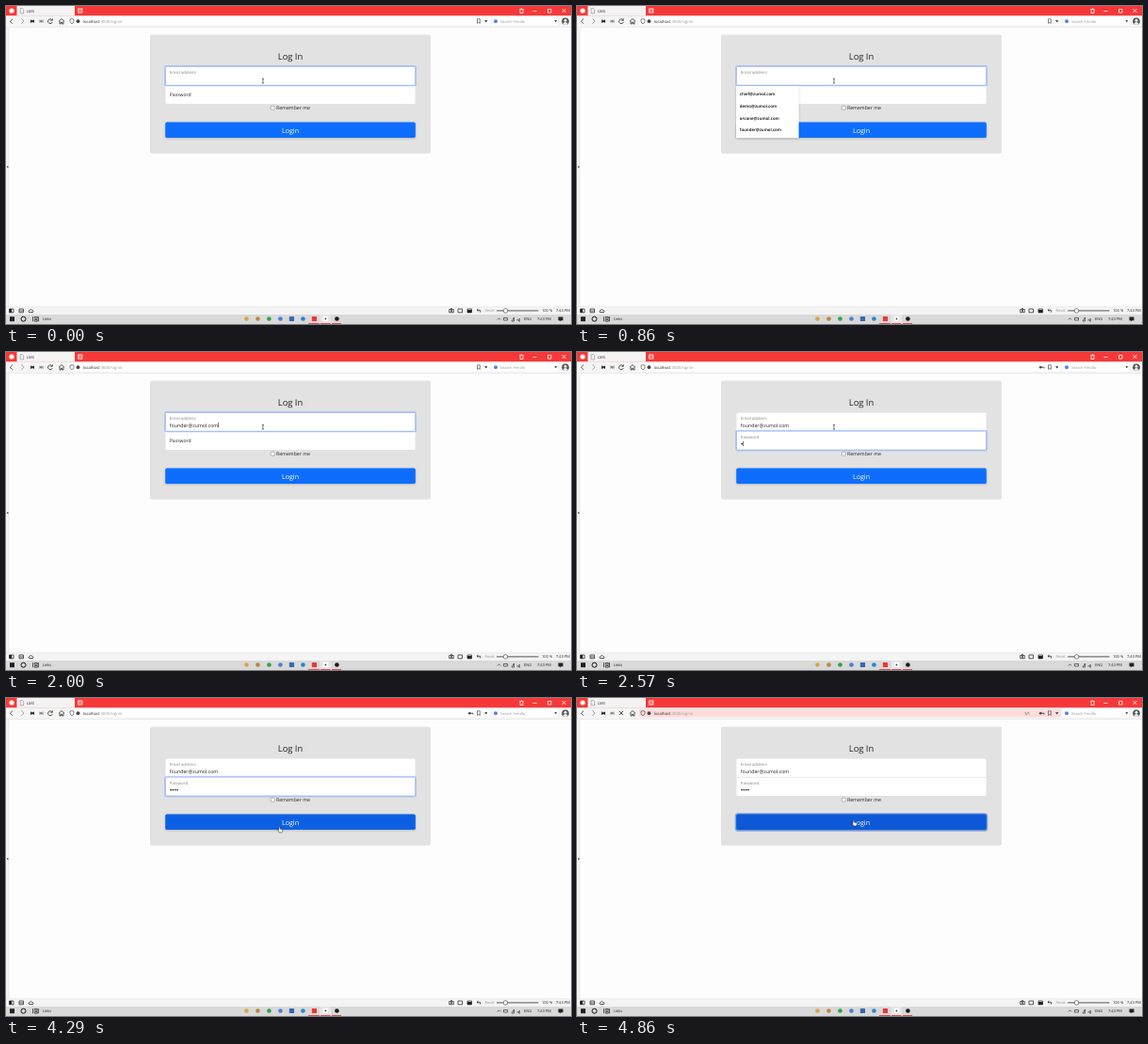
Animation of 600 by 338 pixels, one loop 5.01 s. Source, as an HTML page:

```html
<!DOCTYPE html>
<html lang="en">
<head>
<meta charset="utf-8">
<title>Log In</title>
<style>
  html, body { margin: 0; width: 100%; height: 100%; overflow: hidden; background: #fff; }
  svg { display: block; width: 100vw; height: 100vh; }
  text { font-family: "Open Sans", "Noto Sans", sans-serif; text-rendering: geometricPrecision; fill: #222; white-space: pre; }
  .line { fill: none; stroke: #333; stroke-width: .8; }
  .white { stroke: #fff; }
  .label { font-size: 4.3px; fill: #808080; }
  .value { font-size: 5.26px; }
  .item { font-size: 4.4px; fill: #000; font-weight: 600; }
  .small { font-size: 4px; }
  .grey { fill: #999; }
  .mid { text-anchor: middle; }
</style>
</head>
<body>
<svg viewBox="0 0 600 338" preserveAspectRatio="none">
  <defs>
    <filter id="shadow" x="-10%" y="-20%" width="120%" height="150%">
      <feDropShadow dx="0" dy=".6" stdDeviation="1" flood-opacity=".25"/>
    </filter>
  </defs>
  <rect width="600" height="338" fill="#fdfdfd"/>

  <!-- Tab bar -->
  <rect width="600" height="10.5" fill="#f63838"/>
  <circle cx="6" cy="5" r="2.600" fill="#fff"/>
  <path d="M11.500 10.500V0H73V10.500Z" fill="#f4f2f2"/>
  <path class="line" style="stroke-width:.5;stroke:#777" d="M15.200 2.500h2.200l1.200 1.200v4.200h-3.400z"/>
  <text class="small" x="22" y="6.700">LMS</text>
  <rect x="76" y="2.300" width="5.500" height="5.500" rx="1" fill="#ffb4b4"/>
  <path class="line" style="stroke:#f44" d="M78.750 3.500v3M77.250 5h3"/>
  <path class="line white" d="M545.500 3.500h4M546 3.500v4h3v-4M547 2.700h1M559.500 5.500h4M575.500 3.500h3.500v3.500h-3.500zM590.500 3l4 4m0-4l-4 4"/>

  <!-- Address bar -->
  <rect y="10.500" width="600" height="12" fill="#f5f5f5"/>
  <rect id="address" x="66" y="11.800" width="448" height="8.800" rx="1"/>
  <rect x="516" y="11.800" width="70" height="8.800" rx="1" fill="#fff"/>
  <path d="M0 22.500H600" stroke="#e2e2e2" stroke-width=".6"/>
  <path class="line" d="M7 13.600L4.400 16.200l2.600 2.600"/>
  <path class="line" style="stroke:#888" d="M16.400 13.600l2.600 2.600-2.600 2.600"/>
  <path fill="#222" d="M26 14.400v3.600h.8v-1.400l1.600 1.400v-1.200l1.600 1.200v-3.600l-1.600 1.200v-1.200l-1.600 1.400v-1.400z"/>
  <path fill="#888" d="M35.500 14.400v3.600l1.600-1.200v1.200l1.600-1.400v1.400h.8v-3.600h-.8v1.400l-1.600-1.400v1.200z"/>
  <path id="reload" class="line" d="M48.800 14.700A2.400 2.400 0 1 0 49.300 17M49.300 13.300v2h-2"/>
  <path id="stop" class="line" d="M45 14l4 4m0-4l-4 4"/>
  <path class="line" d="M56 16.200l3-2.600 3 2.600M57 16v3h1.300v-1.700h1.400v1.700h1.300v-3"/>
  <path class="line" style="stroke-width:.6" d="M70 13.600l2 .6v2q0 1.700-2 2.600-2-.9-2-2.600v-2z"/>
  <circle cx="76.500" cy="16.200" r="1.900" fill="#444"/>
  <text x="82" y="17.600" font-size="4.200px">localhost<tspan class="grey">:3000/signin</tspan></text>
  <text id="progress" class="small" x="475" y="17.600" fill="#555">1/1</text>
  <g id="key"><circle cx="492.200" cy="16.200" r="1.300" fill="#444"/><path class="line" d="M493 16.200h3v1.300"/></g>
  <path class="line" style="stroke-width:.6" d="M500.500 13.800h2.800v4.700l-1.400-1.200-1.400 1.200z"/>
  <path fill="#333" d="M508 15.300h3.400l-1.700 2.200zM582.300 15.300h3l-1.500 2z"/>
  <circle cx="520" cy="16.200" r="2" fill="#4f83e8"/>
  <text class="small grey" x="525" y="17.700">Search Fendlo</text>
  <circle cx="594" cy="16.300" r="3.800" fill="#555"/>
  <circle cx="594" cy="15.200" r="1.500" fill="#eee"/>
  <path d="M591.300 18.900q2.700-4 5.400 0q-2.700 2.200-5.400 0z" fill="#eee"/>

  <!-- Page -->
  <rect y="22.800" width="3" height="297" fill="#f3f3f3"/>
  <path d="M3 23V320" stroke="#ddd" stroke-width=".5"/>
  <path d="M.700 171l1.600-1.300v2.600z" fill="#222"/>
  <rect x="153" y="30.500" width="298" height="126.300" rx="2" fill="#e2e2e2"/>
  <text class="mid" x="302" y="57" font-size="9.400px">Log In</text>
  <rect x="169.500" y="64.500" width="265" height="39.500" rx="1.500" fill="#fff"/>
  <path d="M169.500 84.300h265" stroke="#d2d5dc" stroke-width=".6"/>
  <g id="focus" fill="#fff">
    <rect x="169" y="64" width="266" height="20.600" rx="1.500" stroke="#0d6efd" stroke-opacity=".22" stroke-width="2"/>
    <rect x="169.300" y="64.300" width="265.400" height="20" rx="1" stroke="#8fabf2" stroke-width=".8"/>
  </g>
  <text class="label" x="173.800" y="72.300">Email address</text>
  <text id="email" class="value" x="173.800" y="79.500"></text>
  <text id="passwordLabel" x="173.800"></text>
  <g id="dots" fill="#222"></g>
  <path id="caret" class="line" style="stroke:#222;stroke-width:.6"/>
  <rect x="281.200" y="106.200" width="4" height="4" rx=".8" fill="#fff" stroke="#888" stroke-width=".6"/>
  <text x="287" y="110.300" font-size="5.200px">Remember me</text>
  <rect id="buttonGlow" x="168.700" y="123.200" width="266.600" height="17.600" rx="2" fill="none" stroke="#3f7cf0" stroke-opacity=".55" stroke-width="1.800"/>
  <rect id="button" x="169.200" y="123.600" width="265.600" height="16.500" rx="1.700" filter="url(#shadow)"/>
  <text class="mid" x="302" y="134.700" font-size="7.100px" style="fill:#fff">Login</text>
  <g id="menu">
    <rect id="menuBox" x="169" y="85" width="66.500" rx=".8" fill="#fff" filter="url(#shadow)"/>
    <g id="items"></g>
  </g>

  <!-- Status bar -->
  <rect y="319.800" width="600" height="8.200" fill="#f4f4f4"/>
  <path d="M0 319.800H600" stroke="#ddd" stroke-width=".5"/>
  <path class="line" d="M3.500 322h4.500v3.800h-4.500zM14 322h4.500v3.800h-4.500zM14 324h4.500M24.500 325.500q-1.500-1.500.5-2 1-2 3 0 2 .5.500 2z"/>
  <path d="M3.500 322h2.600v3.800h-2.600z" fill="#222"/>
  <path class="line" d="M470.700 322.500h4.600v3.200h-4.600zM472 321.700h2M480 322h4.500v3.800h-4.500zM490 322h4.500v3.800h-4.500zM501.500 322l-1.500 1.300 1.500 1.300M500 323.300h3.500v2.200"/>
  <circle cx="473" cy="324" r=".9" fill="#333"/>
  <path d="M490 323h4.500v3h-4.500z" fill="#222"/>
  <text class="small grey" x="508.500" y="325.400">Reset</text>
  <path d="M521 323.900h44.500" stroke="#555" stroke-width="1"/>
  <circle cx="530.500" cy="323.900" r="2.300" fill="#fff" stroke="#555" stroke-width=".7"/>
  <text class="small" x="569" y="325.400">100 %</text>
  <text class="small" x="584" y="325.400">7:43 PM</text>

  <!-- Taskbar -->
  <rect y="328" width="600" height="10" fill="#d9d9d9"/>
  <rect x="4" y="330.200" width="5" height="5" fill="#222"/>
  <circle class="line" cx="18.500" cy="332.700" r="2.500" style="stroke:#111;stroke-width:1"/>
  <path class="line" d="M28.500 330.200v5M30.300 330.500h3v1.700h-3zM30.300 333.500h3v1.700h-3zM34.500 330.200v5"/>
  <text class="small" x="38.700" y="334.200">Links</text>
  <rect x="333.500" y="328" width="11.500" height="10" fill="#e6e6e6"/>
  <g id="apps"></g>
  <path d="M321 337.500h12M334 337.500h10.500M346 337.500h10" stroke="#e04040" stroke-width=".9"/>
  <path class="line" style="stroke-width:.7" d="M521.800 333.500l1.700-1.700 1.700 1.700M528.500 331.500h4v2.500h-4zM537 335l2.500-4v4zM542.500 333.800h1.300l1.500-1.600v3.200l-1.500-1.600"/>
  <text class="small" x="550" y="334.200">ENG</text>
  <text class="small" x="564" y="334.200">7:43 PM</text>
  <path fill="#222" d="M586.500 330.500h5v3.800h-2l-1.200 1.200v-1.200h-1.800z"/>

  <!-- Pointers -->
  <g id="pointer">
    <path id="beam" class="line" style="stroke:#222;stroke-width:.6" d="M-1.100-2.300h2.200M0-2.300v4.600M-1.100 2.300h2.200"/>
    <path id="arrow" fill="#fff" stroke="#111" stroke-width=".5" d="M-1-3v5.500l1.300-1.200.9 2 .9-.4-.9-1.900h1.700z"/>
    <path id="hand" fill="#fff" stroke="#111" stroke-width=".5" d="M-1-2.600q.600-.8 1.100 0v2.200l2.300.6q.500.300.200 1.800l-.6 1.500h-2.600l-1.700-2.200q0-.8.800-.3z"/>
  </g>
</svg>
<script>
const LOOP = 5010, STEPS_PER_SECOND = 7;
const ADDRESS = "founder@zumol.com";
const SUGGESTIONS = ["chief@zumol.com", "demo@zumol.com", "orvane@zumol.com", ADDRESS];
const APP_COLORS = ["#d9a441", "#b98a3c", "#2aa54a", "#4a7fd4", "#3269b5", "#2389d0", "#e33a3a", "#fff", "#1b1b1b"];
const SQUARE_APPS = [4, 6, 7];

const $ = id => document.getElementById(id);
const set = (id, attrs) => Object.entries(attrs).forEach(([name, value]) => $(id).setAttribute(name, value));
const show = (id, on) => { $(id).style.display = on ? "" : "none"; };
const clamp = (value, low, high) => Math.min(high, Math.max(low, value));
const mix = (a, b, p) => a + (b - a) * p;

$("apps").innerHTML = APP_COLORS.map((color, i) => SQUARE_APPS.includes(i)
  ? `<rect x="${252.8 + i * 12}" y="329.900" width="5.200" height="5.200" rx=".5" fill="${color}"/>`
  : `<circle cx="${255.4 + i * 12}" cy="332.500" r="2.300" fill="${color}"/>`).join("")
  + `<circle cx="339.400" cy="332.500" r=".9" fill="#444"/>`;

function drawMenu(step, typed) {
  const items = typed ? [ADDRESS] : SUGGESTIONS;
  show("menu", step >= 3 && step < 14);
  set("menuBox", { height: 5.2 + items.length * 12.5 });
  $("items").innerHTML = items.map((text, i) =>
    `<text class="item" x="172.800" y="${95.3 + i * 12.6}">${text}</text>`).join("");
}

function drawFields(step, typed, dots) {
  const inPassword = step >= 15, loading = step >= 33;
  show("focus", step < 32);
  set("focus", { transform: `translate(0 ${inPassword ? 19.8 : 0})` });
  $("email").textContent = ADDRESS.slice(0, typed);

  $("passwordLabel").textContent = "Password";
  set("passwordLabel", inPassword ? { class: "label", y: 92.3 } : { class: "", y: 96.3, "font-size": "5.1px" });
  $("dots").innerHTML = Array.from({ length: dots }, (_, i) =>
    `<circle cx="${175 + i * 2.35}" cy="97.600" r=".85"/>`).join("");

  const blinkStart = inPassword ? 16 : typed ? step : 2;
  const lit = step >= blinkStart && (step - blinkStart) % 7 < 3.5;
  const x = inPassword ? 174 + dots * 2.5 : 174.1 + (typed ? $("email").getComputedTextLength() : 0);
  const y = inPassword ? 94.8 : 74.8;
  set("caret", { d: `M${x} ${y}v5.400` });
  show("caret", lit && step < 28);

  show("key", dots > 0);
  show("reload", !loading);
  show("stop", loading);
  show("progress", loading);
  set("address", { fill: loading ? "#ffdcdc" : "#fff" });
}

function drawPointer(step) {
  const travel = clamp((step - 27) / 3, 0, 1);
  const settle = clamp((step - 30) / 2, 0, 1);
  const ease = travel * travel * (3 - 2 * travel);
  const x = mix(272.9, 291, ease) + 3.5 * settle;
  const y = mix(79.7, 139.5, ease) - 7 * settle;
  const overButton = y > 124;
  set("pointer", { transform: `translate(${x} ${y})` });
  show("beam", y < 104);
  show("arrow", y >= 104 && !overButton);
  show("hand", overButton);
  set("button", { fill: step >= 31 ? "#0759d6" : overButton ? "#0860e4" : "#0d6efd" });
  show("buttonGlow", step >= 32);
}

function draw(time) {
  const step = Math.floor((time % LOOP + 5) * STEPS_PER_SECOND / 1000);
  const typed = clamp(Math.round((step - 7) * 8 / 3), 0, ADDRESS.length);
  const dots = step < 16 ? 0 : step < 27 ? 1 : step < 28 ? 2 : 4;
  drawMenu(step, typed);
  drawFields(step, typed, dots);
  drawPointer(step);
}

const start = performance.now();
function tick() {
  draw(performance.now() - start);
  requestAnimationFrame(tick);
}
tick();
</script>
</body>
</html>
```
